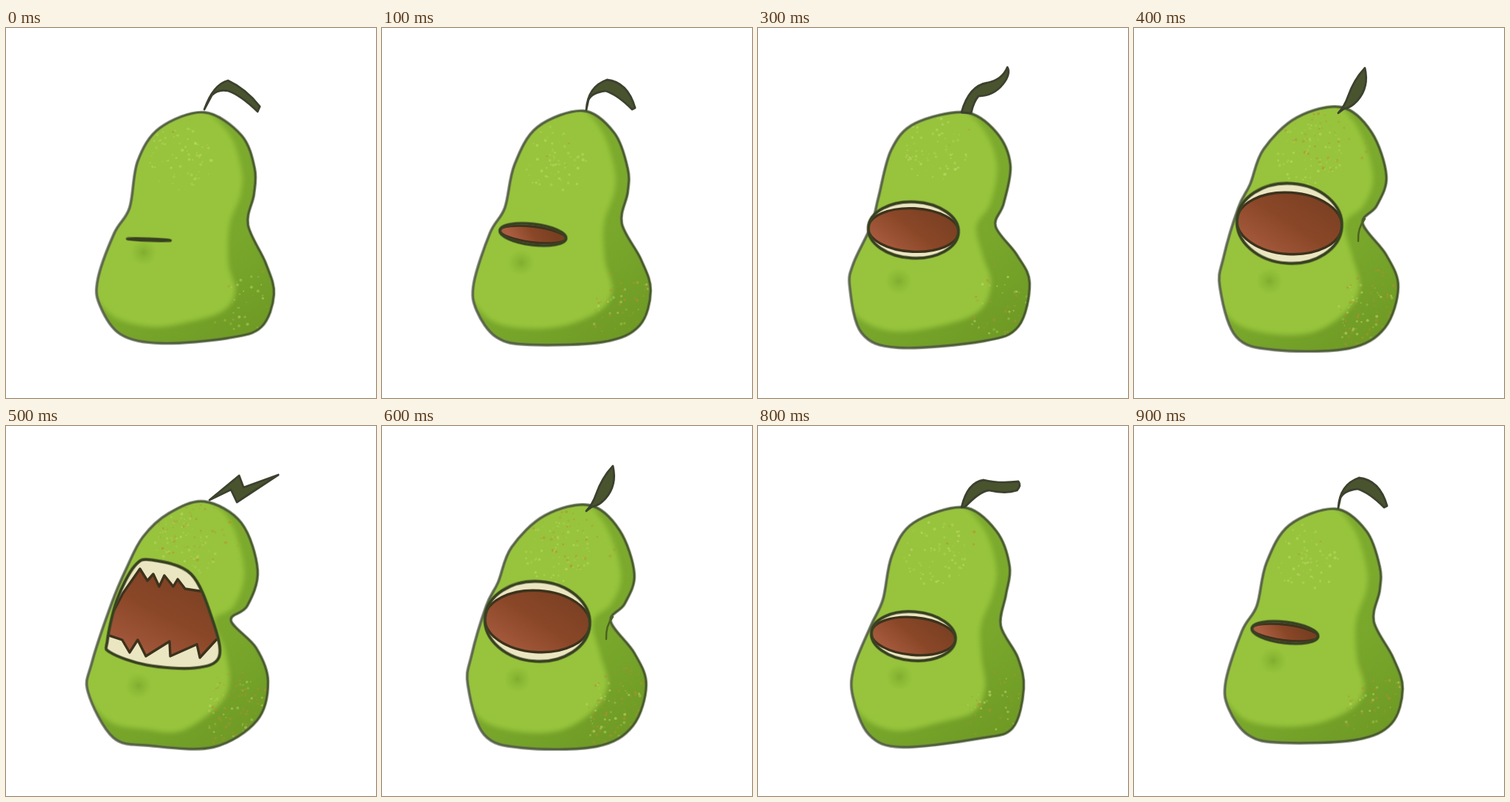
Write an HTML page with a canvas that moves like this. It is 500 px wide and 500 px high and loops after 1 s.

```html
<!DOCTYPE html>
<html lang="en">
<head>
<meta charset="utf-8">
<title>Pear</title>
<style>
html, body { margin: 0; width: 100%; height: 100%; overflow: hidden; background: #fff; }
canvas { display: block; width: 500px; height: 500px; }
</style>
</head>
<body>
<canvas id="stage" width="500" height="500"></canvas>
<script>
const STEP = 100;
const ORDER = [0, 1, 2, 3, 4, 5, 4, 3, 2, 1];

// body: key points clockwise from the crown; mouth: center, radii, tilt in degrees
const POSES = [
  {
    body: '268,114 318,145 336,190 335,225 327,266 351,318 362,360 345,404 300,419 210,426 155,414 127,375 124,340 146,278 167,243 178,180 208,135',
    stem: 'M268 110Q280 76 300 71Q324 82 343 106L340 113Q316 90 300 85Q287 82 278 91Z',
    mouth: [193, 286, 29, 1, 2.5], spot: [186, 303], rust: 15
  },
  {
    body: '272,112 314,142 332,190 332,222 324,264 350,313 363,355 348,402 300,424 200,428 155,418 128,382 124,345 146,277 166,243 179,185 210,134',
    stem: 'M276 111Q278 79 304 70Q332 73 342 108L338 110Q318 90 302 85Q284 87 279 97Z',
    mouth: [204, 279, 45, 14, 7], spot: [188, 317], rust: 45
  },
  {
    body: '278,110 322,142 340,190 335,228 328,270 351,313 359,355 344,408 300,422 195,434 150,417 128,365 130,325 153,269 169,234 181,175 210,131',
    stem: 'M275 110Q283 76 305 73Q325 78 352 75Q356 80 350 87Q335 92 312 87Q300 88 280 109Z',
    mouth: [210, 284, 57, 33, 5], spot: [191, 339], rust: 40
  },
  {
    body: '280,114 322,141 341,185 332,237 321,268 350,307 367,345 352,403 305,423 190,432 140,412 124,350 129,318 153,267 163,228 180,165 212,129',
    stem: 'M275 114Q285 78 310 74Q330 70 337 53Q342 62 331 76Q318 92 298 92Q291 100 288 115Z',
    mouth: [210, 273, 61, 38, 3], spot: [190, 342], rust: 25
  },
  {
    body: '280,107 321,141 341,200 328,240 309,264 341,307 357,350 339,405 290,433 190,435 138,417 116,350 121,310 141,243 157,211 175,164 220,121',
    stem: 'M276 115Q285 105 289 93Q297 70 312 54Q318 80 302 98Q293 108 284 109Z',
    crease: 'M312 258Q302 270 303 288',
    mouth: [210, 264, 71, 54, 4], spot: [183, 342], rust: 90
  },
  {
    body: '268,102 318,131 340,195 326,243 304,263 338,300 354,345 339,398 280,434 195,432 145,421 111,360 116,320 143,239 163,192 185,150 220,118',
    stem: 'M275 100L315 67L321 83L368 66L312 103L304 86Z',
    maw: '137,290 150,235 174,189 197,181 250,200 279,262 288,312 255,327 190,323 141,306',
    teeth: 'M158 226L181 193L191 209L199 200L207 217L214 202L226 217L232 207L242 220L268 224' +
      'L300 285L284 289L262 313L258 295L222 311L221 291L189 311L178 289L167 306L157 289L130 280Z',
    spot: [179, 351], rust: 110
  }
];

const ctx = document.getElementById('stage').getContext('2d');
ctx.lineCap = ctx.lineJoin = 'round';

const points = text => text.split(' ').map(p => p.split(',').map(Number));
const clamp = t => Math.min(1, Math.max(0, t));
const smooth = (a, b, x) => { const t = clamp((x - a) / (b - a)); return t * t * (3 - 2 * t); };
const middle = (a, b) => [(a[0] + b[0]) / 2, (a[1] + b[1]) / 2];

// smooth closed loop through the points
function loop(p) {
  const n = p.length, path = new Path2D(), at = i => p[(i + n) % n];
  path.moveTo(...p[0]);
  for (let i = 0; i < n; i++) {
    const [a, b, c, d] = [at(i - 1), at(i), at(i + 1), at(i + 2)];
    path.bezierCurveTo(b[0] + (c[0] - a[0]) / 6, b[1] + (c[1] - a[1]) / 6,
      c[0] - (d[0] - b[0]) / 6, c[1] - (d[1] - b[1]) / 6, c[0], c[1]);
  }
  path.closePath();
  return path;
}

function oval(x, y, rx, ry, tilt) {
  const path = new Path2D();
  path.ellipse(x, y, rx, ry, tilt * Math.PI / 180, 0, Math.PI * 2);
  return path;
}

// the lit side is the body drawn in from the right and from below
function lit([x, y]) {
  const right = clamp((x - 200) / 100);
  const dx = right * (18 + 34 * smooth(240, 330, y)) + 6 * (1 - right);
  const dy = 22 * smooth(340, 410, y) + 10 * (1 - smooth(110, 170, y));
  return [x - dx, y - dy];
}

function seeded(seed) {
  return () => (seed = (seed * 16807) % 2147483647) / 2147483647;
}

function fill(path, color) {
  ctx.fillStyle = color;
  ctx.fill(path);
}

function stroke(path, color, width) {
  ctx.strokeStyle = color;
  ctx.lineWidth = width;
  ctx.stroke(path);
}

function ramp(x0, y0, x1, y1, ...colors) {
  const g = ctx.createLinearGradient(x0, y0, x1, y1);
  colors.forEach((c, i) => g.addColorStop(i / (colors.length - 1), c));
  return g;
}

function scatter(rnd, color, [x, y], w, h, count) {
  ctx.fillStyle = color;
  for (let i = 0; i < count; i++) {
    const turn = rnd() * Math.PI * 2, far = Math.sqrt(rnd());
    ctx.globalAlpha = 0.2 + rnd() * 0.4;
    ctx.beginPath();
    ctx.arc(x + Math.cos(turn) * far * w, y + Math.sin(turn) * far * h, 0.7 + rnd() * 1.4, 0, 7);
    ctx.fill();
  }
  ctx.globalAlpha = 1;
}

function drawSpot([x, y]) {
  const g = ctx.createRadialGradient(x, y, 0, x, y, 18);
  g.addColorStop(0, 'rgba(108,150,35,.5)');
  g.addColorStop(1, 'rgba(120,165,40,0)');
  fill(oval(x, y, 18, 18, 0), g);
}

function drawMouth({ mouth, maw, teeth }) {
  const [x, y, rx, ry, tilt] = mouth || [212, 255, 76, 73, 0];
  const rim = maw ? loop(points(maw)) : oval(x, y, rx, ry, tilt);
  const inner = teeth ? new Path2D(teeth) : oval(x, y, rx, ry * 0.77, tilt);
  ctx.save();
  ctx.clip(rim);
  fill(rim, '#ebe6c2');
  fill(inner, ramp(x + rx * 0.5, y - ry, x - rx * 0.5, y + ry, '#783f21', '#8a4728', '#ab5d40'));
  stroke(inner, '#3d321c', 3.4);
  ctx.restore();
  stroke(rim, 'rgba(70,76,48,.5)', 5);
  stroke(rim, '#38411f', 3.2);
}

function drawPear(index) {
  const pose = POSES[index], keys = points(pose.body), body = loop(keys);
  const rnd = seeded(101 + index * 977);
  const head = middle(keys[2], keys[15]), hip = middle(keys[6], keys[8]);
  ctx.fillStyle = '#fff';
  ctx.fillRect(0, 0, 500, 500);

  fill(body, ramp(215, 215, 345, 400, '#7dab2d', '#79a72b', '#6f9b25'));
  ctx.save();
  ctx.clip(body);
  ctx.filter = 'blur(3px)';
  fill(loop(keys.map(lit)), '#97c43c');
  ctx.filter = 'none';
  scatter(rnd, '#bddb69', [head[0] - 20, head[1] - 10], 45, 45, 70);
  scatter(rnd, '#bddb69', hip, 50, 55, 45);
  scatter(rnd, '#b98c32', hip, 45, 70, pose.rust);
  scatter(rnd, '#b98c32', [head[0], head[1] - 28], 60, 40, Math.max(4, pose.rust - 50));
  drawSpot(pose.spot);
  ctx.restore();

  stroke(body, 'rgba(95,102,88,.6)', 4.4);
  stroke(body, ramp(130, 0, 350, 0, 'rgba(70,78,58,.6)', '#435b1d'), 2.4);
  if (pose.crease) stroke(new Path2D(pose.crease), '#4b6420', 2.5);

  const stem = new Path2D(pose.stem);
  fill(stem, '#49542f');
  stroke(stem, '#3c412f', 2.8);
  drawMouth(pose);
}

const start = performance.now();
let shown = -1;
function tick() {
  const step = Math.floor((performance.now() - start) / STEP) % ORDER.length;
  if (step !== shown) drawPear(ORDER[shown = step]);
  requestAnimationFrame(tick);
}
tick();
</script>
</body>
</html>
```
